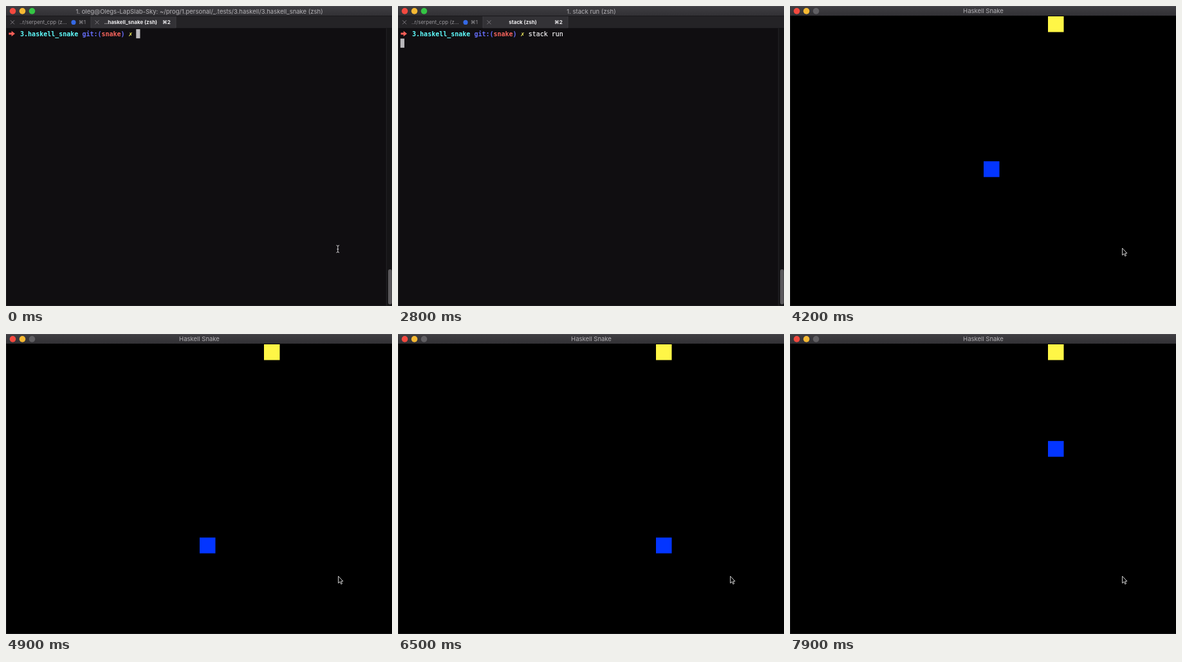
Animation, 600 px wide and 466 px high, one loop 8000 ms. Source, as an HTML page:

```html
<!DOCTYPE html>
<html lang="en">
<head>
<meta charset="utf-8">
<title>Snake in the terminal</title>
<style>
  html, body { margin: 0; width: 100%; height: 100%; overflow: hidden; background: #000; }
  svg { display: block; width: 100vw; height: 100vh; }
  text { white-space: pre; }
  .title { font: 9.5px Inter, Roboto, sans-serif; fill: #b3b1b5; text-anchor: middle; }
  .tab { font: 8px Inter, "DejaVu Sans", sans-serif; fill: #99979b; }
  .on { font-weight: 700; fill: #f0eff1; }
  .mid { text-anchor: middle; }
  .mono { font: 10px "DejaVu Sans Mono", monospace; fill: #f6f5f7; stroke: #f6f5f7; stroke-width: .2; }
  .b { font-weight: 700; stroke: none; }
</style>
</head>
<body>
<svg viewBox="0 0 600 466" preserveAspectRatio="none">
  <defs>
    <linearGradient id="bar" x2="0" y2="1">
      <stop stop-color="#3f3e42"/>
      <stop offset="1" stop-color="#323135"/>
    </linearGradient>
    <path id="close" d="M-3 -3L3 3M3 -3L-3 3" stroke="#858387" stroke-width=".9"/>
    <g id="frame">
      <rect width="600" height="15" fill="url(#bar)"/>
      <rect width="600" height=".7" fill="#525155"/>
      <circle cx="10.5" cy="7.9" r="4.8" fill="#f4493f"/>
      <circle cx="25.5" cy="7.9" r="4.8" fill="#f6b933"/>
    </g>
  </defs>

  <g id="terminal">
    <rect width="600" height="466" fill="#100e11"/>
    <use href="#frame"/>
    <circle cx="40.5" cy="7.9" r="4.8" fill="#34c544"/>
    <text id="title" class="title" x="300.5" y="11.6"></text>

    <rect y="15" width="600" height="19.3" fill="#242326"/>
    <rect x="132" y="16" width="132" height="18.3" fill="#333236"/>
    <path d="M0 15.5H600" stroke="#19181b"/>
    <path d="M132 16V34M264 16V34" stroke="#444347" stroke-width=".8"/>
    <use href="#close" x="10" y="25.3"/>
    <use href="#close" x="141.5" y="25.3"/>
    <text class="tab" x="21" y="28.4">..r/serpent_cpp (z…</text>
    <circle cx="105" cy="25.4" r="3.6" fill="#3569e4"/>
    <text class="tab mid" x="118.3" y="28.4">⌘1</text>
    <text id="tab" class="tab on mid" x="194" y="28.4"></text>
    <text class="tab on mid" x="249.3" y="28.4">⌘2</text>

    <path d="M4.4 41.6H8.6V38.8L14 43L8.6 47.2V44.4H4.4Z" fill="#fa5f58"/>
    <g id="prompt"></g>
    <rect id="caret" width="6.2" height="14.2" fill="#bab8bc"/>

    <rect x="591" y="34.5" width="9" height="432" fill="#151416"/>
    <path d="M591.3 34.5V466" stroke="#29282b" stroke-width=".8"/>
    <rect x="594" y="409" width="5.8" height="54.5" rx="2.9" fill="#5a585b"/>
    <path d="M.3 15V466M0 465.7H600" stroke="#302f32" stroke-width=".6"/>
    <path id="beam" d="M513.5 371.8Q515.8 371.8 515.8 373.6Q515.8 371.8 518.1 371.8M515.8 373.4V381.4M513.5 383Q515.8 383 515.8 381.2Q515.8 383 518.1 383M514.4 377.8H517.2"
      fill="none" stroke="#d2d0d3" stroke-width="1"/>
  </g>

  <g id="game">
    <rect width="600" height="466"/>
    <use href="#frame"/>
    <circle cx="40.5" cy="7.9" r="4.8" fill="#605f63"/>
    <text class="title" x="300.5" y="11.4">Haskell Snake</text>
    <path d="M.3 15V466M0 465.7H600" stroke="#302f32" stroke-width=".6"/>
    <rect x="401" y="16" width="24.5" height="24.5" fill="#fff646"/>
    <rect id="snake" width="24.5" height="24.5" fill="#0335ff"/>
    <path d="M516.6 376.2V387L519.1 384.7L520.8 388.5L522.5 387.8L520.9 384.1H523.9Z" fill="#000" stroke="#e8e8e8" stroke-width=".9"/>
  </g>
</svg>

<script>
  const LOOP = 8000, CELL = 25, COL = 6.02;
  const $ = id => document.getElementById(id);
  const show = (id, on) => $(id).style.display = on ? "" : "none";
  const passed = (times, t) => times.filter(s => s <= t).length;
  const colX = col => 4 + COL * col;

  const COMMAND = "stack run";
  const KEYS = [300, 500, 700, 800, 1200, 1400, 1700, 1900, 2100];
  const RUN = 2500, ENTER = 2600, BUSY = 3000, GAME = 4000;

  // Each leg of the snake: heading, then the times of its steps.
  const LEGS = [
    [0, 1, [4500, 4700, 4900, 5100, 5300]],
    [1, 0, [5500, 5700, 5900, 6100]],
    [0, -1, [6300, 6500, 6700, 6900, 7100, 7400, 7600, 7800]]
  ];

  function addText(col, fill, str, bold = true) {
    const el = document.createElementNS("http://www.w3.org/2000/svg", "text");
    el.setAttribute("class", bold ? "mono b" : "mono");
    el.setAttribute("x", colX(col));
    el.setAttribute("y", 46.5);
    if (fill) el.style.fill = fill;
    el.textContent = str;
    $("prompt").append(el);
    return el;
  }
  addText(3, "#5ffcfd", "3.haskell_snake");
  addText(19, "#656dfa", "git:(");
  addText(24, "#fa655e", "snake");
  addText(29, "#656dfa", ")");
  addText(31, "#fdf963", "✗");
  const typed = addText(33, "", "", false);

  function drawTerminal(t) {
    const count = passed(KEYS, t);
    typed.textContent = COMMAND.slice(0, count);
    const entered = t >= ENTER;
    $("caret").setAttribute("x", entered ? 3.7 : colX(33 + count) - .4);
    $("caret").setAttribute("y", entered ? 50.6 : 36);
    const job = t >= BUSY ? "stack" : "zsh";
    $("title").textContent = t >= RUN
      ? `1. stack run (${job})`
      : "1. oleg@Olegs-LapSlab-Sky: ~/prog/1.personal/_.tests/3.haskell/3.haskell_snake (zsh)";
    $("tab").textContent = t >= RUN ? `stack (${job})` : "..haskell_snake (zsh)";
    show("beam", t < KEYS[0]);
  }

  function drawSnake(t) {
    let x = 12, y = 9;
    for (const [dx, dy, times] of LEGS) {
      const steps = passed(times, t);
      x += dx * steps;
      y += dy * steps;
    }
    $("snake").setAttribute("x", x * CELL + 1);
    $("snake").setAttribute("y", y * CELL + 16.2);
  }

  function render(t) {
    const playing = t >= GAME;
    show("terminal", !playing);
    show("game", playing);
    if (playing) drawSnake(t);
    else drawTerminal(t);
  }

  const start = performance.now();
  function tick() {
    render((performance.now() - start) % LOOP);
    requestAnimationFrame(tick);
  }
  tick();
</script>
</body>
</html>
```
